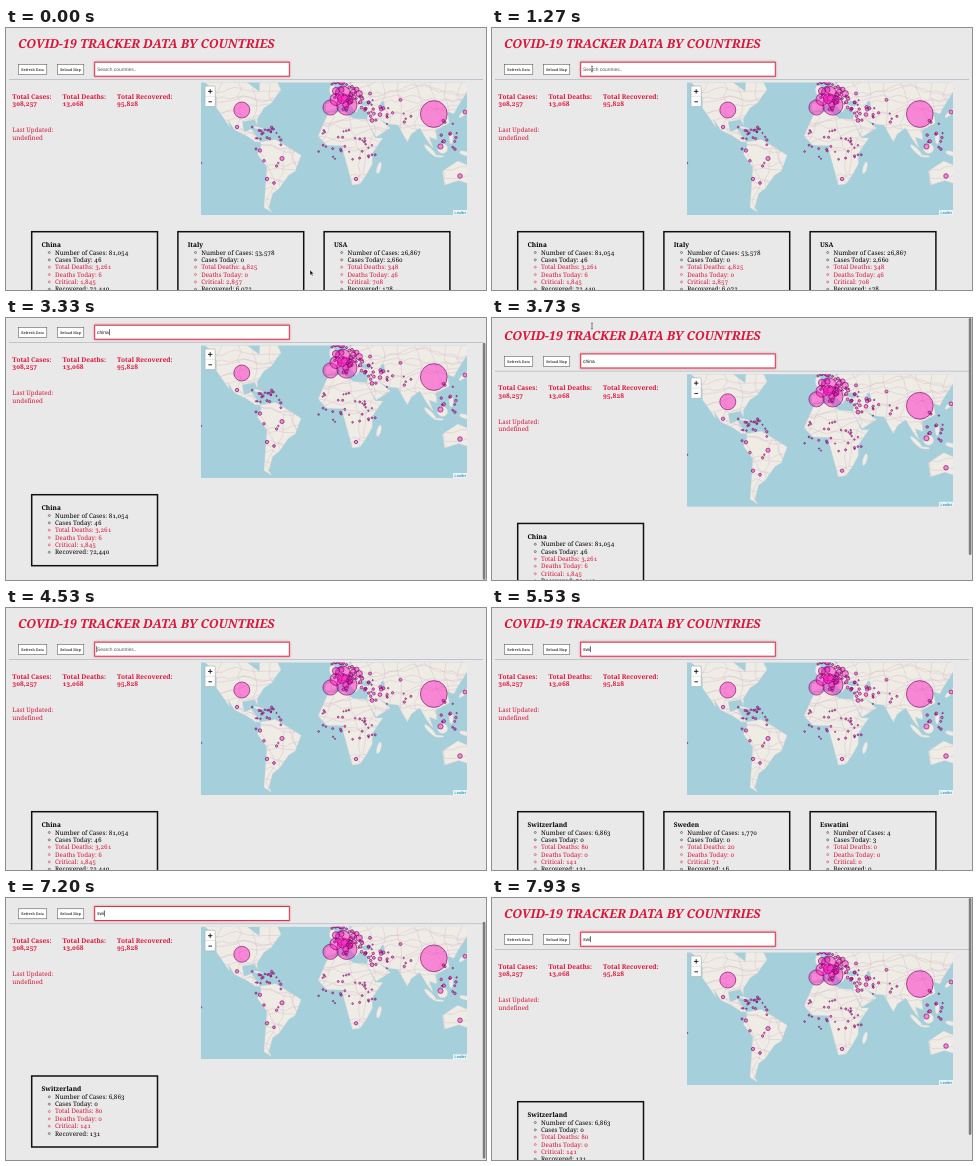
An HTML page for the animation above (8000 ms loop, 480x262 px).

```html
<!DOCTYPE html>
<html lang="en">
<head>
<meta charset="utf-8">
<title>Tracker</title>
<style>
  html, body { margin: 0; width: 100%; height: 100%; overflow: hidden; background: #e9e9e9; }
  svg { display: block; width: 480px; height: 262px; }
  text { font: 6.25px "Noto Serif", serif; font-variant-numeric: oldstyle-nums; text-rendering: geometricPrecision; }
  .bold { font-weight: 700; font-size: 6.55px; }
  .title { font: italic 700 12.4px "Noto Serif", serif; }
  .red { fill: #d9173a; }
  .button { font-size: 3.7px; text-anchor: middle; }
  .field { font: 4.9px "Liberation Sans", Arial, sans-serif; }
  .box { fill: #fff; stroke: #444; stroke-width: .5; }
  .card { fill: none; stroke: #111; stroke-width: 1.5; }
  .land { fill: #efebe5; stroke: #d9d3d3; stroke-width: .3; }
  .border { fill: none; stroke: #cdb3c6; stroke-width: .35; }
  .spot { fill: #ff0fbf; fill-opacity: .45; stroke: #6b0a5c; stroke-width: .6; }
</style>
</head>
<body>
<svg viewBox="0 0 480 262">
  <defs>
    <clipPath id="frame"><rect x="195" y="54.5" width="266" height="132.5"/></clipPath>
    <filter id="glow"><feGaussianBlur stdDeviation="1"/></filter>
  </defs>
  <rect width="480" height="262" fill="#e9e9e9"/>
  <g id="page">
    <text class="title red" x="12" y="20">COVID-19 TRACKER DATA BY COUNTRIES</text>
    <rect class="box" x="12.3" y="36.5" width="28.5" height="10"/>
    <text class="button" x="26.6" y="42.9">Refresh Data</text>
    <rect class="box" x="51.3" y="36.5" width="26.5" height="10"/>
    <text class="button" x="64.6" y="42.9">Reload Map</text>
    <rect x="88" y="33.5" width="196" height="15.5" fill="#e58a98" filter="url(#glow)"/>
    <rect x="88.7" y="34.2" width="194.6" height="14" fill="#fff" stroke="#d4364f"/>
    <text id="query" class="field" x="91" y="43"></text>
    <rect id="caret" y="38.2" width=".6" height="6" fill="#111"/>
    <rect x="3" y="51" width="474" height=".8" fill="#b9bac6"/>
    <g id="stats"></g>
    <text class="red" x="6.3" y="104">Last Updated:</text>
    <text class="red" x="6.3" y="111.7">undefined</text>
    <g id="map" clip-path="url(#frame)"></g>
    <rect x="199" y="58" width="10.3" height="20.6" rx="1.2" fill="#fff" stroke="#a9b5b7" stroke-width=".7"/>
    <path d="M199 68.3h10.3" stroke="#ccc" stroke-width=".5"/>
    <path d="M202 63.4h4.4M204.2 61.2v4.4M202.4 73.8h3.6" stroke="#111" stroke-width=".9"/>
    <rect x="447" y="182" width="14" height="5" fill="#fff" fill-opacity=".75"/>
    <text class="field" x="448.6" y="185.9" style="font-size:3.7px" fill="#0078a8">Leaflet</text>
    <g id="cards"></g>
  </g>
  <rect id="thumb" x="476.8" width="2.6" height="237" rx="1.3" fill="#7d7d7d"/>
  <path id="arrow" d="M0 0v5.2l1.2-1.1.9 2 .9-.4-.9-1.9h1.7z" fill="#111" stroke="#fff" stroke-width=".4"/>
  <path id="beam" d="M-1-3 0-2.5 1-3M0-2.5v5M-1 3 0 2.5 1 3" fill="none" stroke="#333" stroke-width=".6"/>
</svg>
<script>
const LOOP = 8000;
const el = id => document.getElementById(id);
const text = (x, y, value, cls = '') => `<text x="${x}" y="${y}" class="${cls}">${value}</text>`;

// Mercator projection used by the map
const mapX = lon => 328.3 + .95 * lon;
const mapY = lat => 121.5 - 54.4 * Math.asinh(Math.tan(lat * Math.PI / 180));
function outline(points) {
  let path = '';
  for (let i = 0; i < points.length; i += 2) {
    path += (i ? 'L' : 'M') + mapX(points[i]).toFixed(1) + ' ' + mapY(points[i + 1]).toFixed(1);
  }
  return path + 'Z';
}

// Coastlines as longitude, latitude
const northAmerica = [-145,61, -133,56, -124,48, -124,40, -117,32, -110,23, -112,30, -105,20, -92,14, -83,8,
  -78,8, -83,15, -87,21, -95,18, -97,28, -84,30, -81,25, -81,31, -74,40, -66,44, -60,50, -56,53, -62,60,
  -78,62, -79,52, -93,58];
const southAmerica = [-78,8, -62,10.5, -51,4, -35,-6, -41,-22, -48,-26, -58,-38, -65,-42, -69,-52, -66,-55,
  -74,-52, -71,-18, -81,-5, -77,4];
const africa = [-6,36, 10,37, 20,31, 34,30, 43,12, 51,12, 40,-4, 40,-15, 33,-27, 27,-34, 19,-35, 9,-1,
  9,4, -8,4.5, -17,14, -10,29];
const eurasia = [-9,43, -9,37, 0,38, 8,44, 16,38, 13,45, 23,36.5, 26,40, 36,36.5, 34,29, 44,13, 59,22,
  48,30, 57,26, 67,25, 77,8, 81,16, 90,22, 98,9, 104,1.5, 100,13, 108,10, 107,20, 121,27, 119,37, 126,35,
  129,40, 141,53, 142,62, 5,62, 8,58, 15,56, 20,60, 24,59, 10,54, -4,48, -1,46];
const australia = [114,-22, 130,-12, 142,-17, 142,-34, 131,-31, 116,-35];
// longitude, latitude, radii, tilt
const islands = [[-2,53,3,5,0], [47,-19,2,6,15], [101,-1,2,8,-45], [114,1,5,5,0], [137,-4,5,2,15],
  [137,36,2,7,50], [123,12,2,6,0], [-80,22,5,1,15], [110,-7,5,1,5]];
// x, y, half width, half height, count, largest radius
const clusters = [[340,65,14,12,26,3.2], [352,75,15,11,20,2], [368,87,14,8,14,2], [260,105,16,6,20,1.2],
  [340,117,30,15,34,1.1], [437,107,14,16,13,1.7], [395,85,20,14,9,1.6], [262,125,13,17,6,1.4]];
// x, y, radius
const spots = [[427.8,86,13.4], [235.8,82,8], [340.8,77,10.2], [324.5,79.5,7.6], [336.8,65.5,7.5],
  [330,71.5,6], [336.5,70.5,5], [330,63,3.6], [459,84,2], [454,148,2.3], [434.5,118.5,2.6],
  [276,130.5,2.1], [254,122.5,1.7], [261,151,1.7], [268,155,1.4], [231,99,1.7], [350,151,1.7], [195,135,.8]];

function seeded(seed) {
  return () => (seed = seed * 16807 % 2147483647) / 2147483647;
}

function drawMap() {
  const random = seeded(77), spread = size => size * (random() * 2 - 1);
  const small = clusters.flatMap(([x, y, w, h, count, max]) => Array.from({ length: count }, () =>
    [x + spread(w), y + spread(h), .6 + (max - .6) * random()]));
  // Crooked frontiers in both directions, cut to the land
  let frontiers = '';
  for (let line = 0; line < 34; line++) {
    const across = line % 2;
    let x = across ? 195 : 200 + line * 8, y = across ? 58 + line * 3.4 : 54;
    frontiers += `M${x} ${y}`;
    while (x < 461 && y < 187) {
      x += across ? 7 : spread(5);
      y += across ? spread(4) : 7;
      frontiers += `L${x.toFixed(1)} ${y.toFixed(1)}`;
    }
  }
  const coast = [northAmerica, southAmerica, africa, eurasia, australia].map(outline).join('');
  el('map').innerHTML = '<rect x="195" y="54" width="266" height="133" fill="#a5cfda"/>' +
    `<clipPath id="land"><path d="${coast}"/></clipPath><path class="land" d="${coast}"/>` +
    `<path class="border" clip-path="url(#land)" d="${frontiers}"/>` +
    islands.map(([lon, lat, rx, ry, tilt]) => `<ellipse class="land" rx="${rx}" ry="${ry}"
      transform="translate(${mapX(lon)} ${mapY(lat)}) rotate(${tilt})"/>`).join('') +
    '<g fill="#a5cfda"><ellipse cx="360.5" cy="75.5" rx="5.5" ry="2.4"/><ellipse cx="376.5" cy="77.5" rx="2" ry="4.6"/></g>' +
    [...spots, ...small].map(([x, y, r]) =>
      `<circle class="spot" cx="${x.toFixed(1)}" cy="${y.toFixed(1)}" r="${r.toFixed(2)}"/>`).join('');
}

function drawStats() {
  const stats = [[6.3, 'Cases', '308,257'], [56.5, 'Deaths', '13,068'], [111, 'Recovered', '95,828']];
  el('stats').innerHTML = stats.map(([x, label, value]) =>
    text(x, 70.6, `Total ${label}:`, 'bold red') + text(x, 77.9, value, 'bold red')).join('');
}

const labels = ['Number of Cases', 'Cases Today', 'Total Deaths', 'Deaths Today', 'Critical', 'Recovered'];
const countries = [
  ['China', 81054, 46, 3261, 6, 1845, 72440], ['Italy', 53578, 0, 4825, 0, 2857, 6072],
  ['USA', 26867, 2660, 348, 46, 708, 178], ['Spain', 25496, 0, 1381, 0, 1612, 2125],
  ['France', 14459, 0, 562, 0, 1525, 1587], ['S. Korea', 8799, 147, 102, 8, 59, 2612],
  ['Switzerland', 6863, 0, 80, 0, 141, 131], ['Sweden', 1770, 0, 20, 0, 71, 16],
  ['Eswatini', 4, 3, 0, 0, 0, 0],
];

function card([name, ...values], column) {
  const rows = values.map((value, i) => {
    const y = 226.5 + 7.35 * i, red = i > 1 && i < 5;
    return `<circle cx="43.3" cy="${y - 2}" r="1" fill="none" stroke="${red ? '#d9173a' : '#222'}" stroke-width=".5"/>` +
      text(49, y, `${labels[i]}: ${value.toLocaleString('en-US')}`, red ? 'red' : '');
  });
  return `<g transform="translate(${146.2 * column})"><rect class="card" x="25.7" y="203.7" width="125.8" height="71"/>` +
    text(35.5, 219, name, 'bold') + rows.join('') + '</g>';
}

let shownFilter = null;
function drawCards(filter) {
  if (filter === shownFilter) return;
  shownFilter = filter;
  el('cards').innerHTML = countries.filter(c => c[0].toLowerCase().includes(filter)).slice(0, 3).map(card).join('');
}

const typed = [[0, ''], [1530, 'c'], [1670, 'ch'], [1800, 'chi'], [1930, 'chin'], [2130, 'china'],
  [4530, ''], [4670, 's'], [5070, 'sw'], [5530, 'swi']];
const applied = [[0, ''], [1670, 'c'], [1870, 'ch'], [2000, 'chi'], [2200, 'china'],
  [4870, 's'], [5200, 'sw'], [5670, 'swi']];
const scrollKeys = [[0, 0], [2470, 0], [2830, 28.5], [3270, 27], [3330, 27], [3620, -2], [4130, 0],
  [6470, 0], [6770, 28], [6930, 27], [7070, 27], [7200, 25.7], [7530, -1.5], [7870, 0], [LOOP, 0]];
const caretOff = [[0, 470], [900, 1300], [2400, 2930], [3460, 3990], [6200, 6700], [7250, 7780]];

const latest = (steps, t) => steps.findLast(([start]) => t >= start)[1];
const within = (t, from, to) => t >= from && t < to;
const ease = p => p * p * (3 - 2 * p);
const show = (id, on) => el(id).setAttribute('visibility', on ? 'visible' : 'hidden');

function scrollAt(t) {
  const i = scrollKeys.findIndex(([time]) => time > t);
  const [t0, a] = scrollKeys[i - 1], [t1, b] = scrollKeys[i];
  return a + (b - a) * ease((t - t0) / (t1 - t0));
}

function render(t) {
  const query = latest(typed, t), field = el('query');
  const label = query || 'Search countries..';
  if (field.textContent !== label) field.textContent = label;
  field.setAttribute('fill', query ? '#111' : '#555');
  el('caret').setAttribute('x', query ? 91.3 + field.getComputedTextLength() : 90.5);
  show('caret', !caretOff.some(([from, to]) => within(t, from, to)));
  drawCards(latest(applied, t));

  const scroll = scrollAt(t);
  el('page').setAttribute('transform', `translate(0 ${-scroll.toFixed(2)})`);
  el('thumb').setAttribute('y', Math.min(25, Math.max(0, scroll * .92)));
  show('thumb', within(t, 2500, 4230) || t >= 6470);

  const move = ease(Math.min(1, Math.max(0, (t - 70) / 200)));
  el('arrow').setAttribute('transform', `translate(${304 - 204 * move} ${242 - 201 * move})`);
  show('arrow', t < 270);
  el('beam').setAttribute('transform', `translate(100 ${t < 2000 ? 41 : 8})`);
  show('beam', within(t, 270, 1530) || within(t, 3400, 4230));
}

drawMap();
drawStats();
(function tick() {
  render(performance.now() % LOOP);
  requestAnimationFrame(tick);
})();
</script>
</body>
</html>
```
